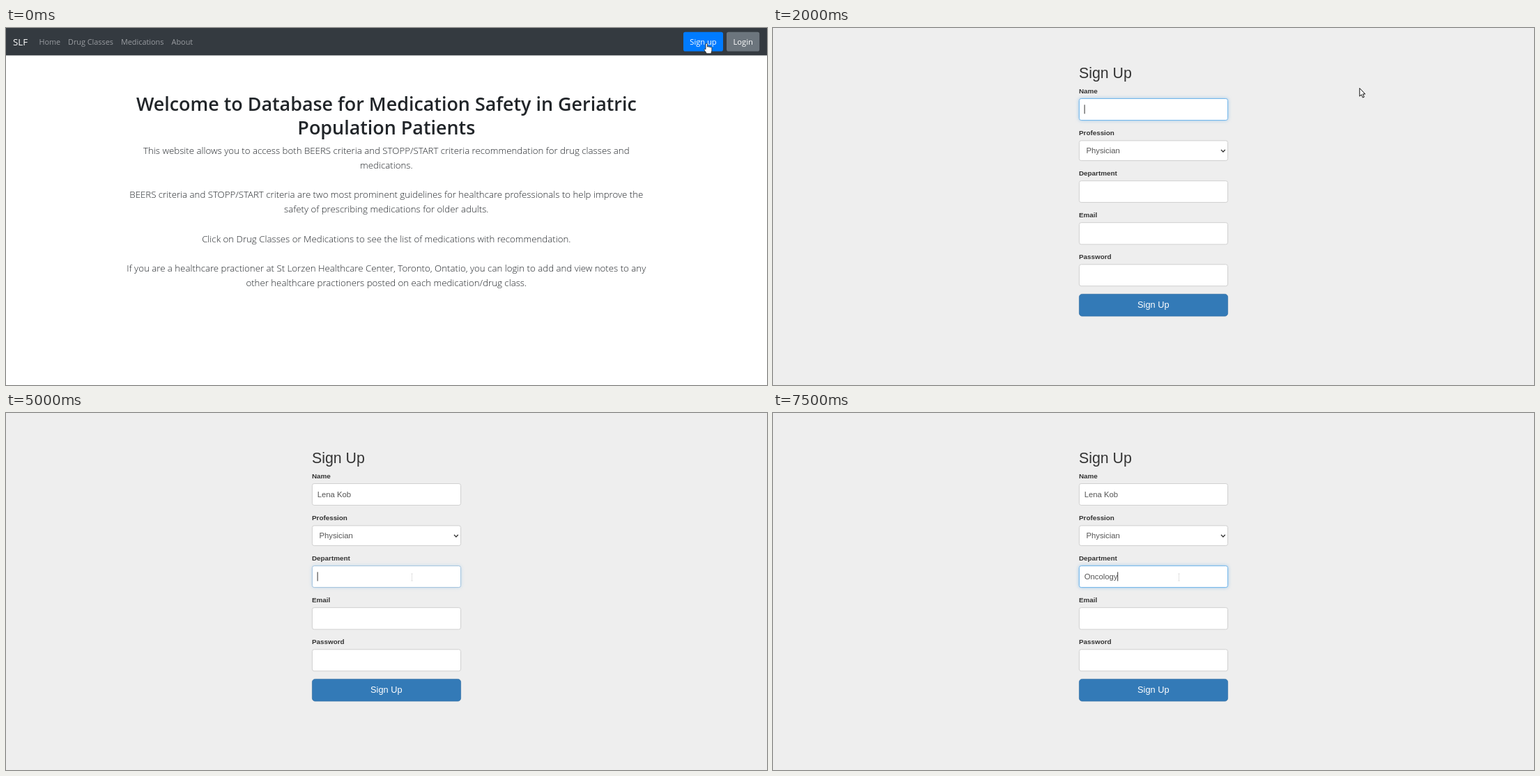
Write an HTML page that moves like this. It is 1092 px wide and 513 px high and loops after 8000 ms.

```html
<!DOCTYPE html>
<html lang="en">
<head>
<meta charset="utf-8">
<title>Sign up</title>
<style>
html, body { margin: 0; width: 100%; height: 100%; overflow: hidden; background: #eee; }
svg { display: block; width: 1092px; height: 513px; }
#home, #status { font-family: "Open Sans", "Noto Sans", sans-serif; }
#form { font-family: "Liberation Sans", Arial, sans-serif; fill: #333; }
.nav { font-size: 10.85px; fill: #999ca0; }
.btn { font-size: 11.1px; fill: #fff; text-anchor: middle; }
.title { font-size: 26.9px; font-weight: 600; fill: #212529; text-anchor: middle; }
.lead { font-size: 13.25px; font-weight: 300; fill: #212529; text-anchor: middle; }
.label { font-size: 9.86px; font-weight: 700; }
.value { font-size: 11.27px; fill: #555; }
.field { fill: #fff; stroke: #ccc; stroke-width: .9; }
.field.focus { stroke: #66afe9; filter: drop-shadow(0 0 2.8px rgba(102,175,233,.6)); }
.field.soft { stroke: #99bddb; filter: drop-shadow(0 0 2.8px rgba(102,175,233,.3)); }
</style>
</head>
<body>
<svg viewBox="0 0 1092 513">
  <g id="home">
    <rect width="1092" height="513" fill="#fff"/>
    <rect width="1092" height="39.4" fill="#343a40"/>
    <text x="10" y="24.8" font-size="13.3" fill="#fff">SLF</text>
    <g class="nav">
      <text x="47.4" y="24">Home</text>
      <text x="89" y="24">Drug Classes</text>
      <text x="165" y="24">Medications</text>
      <text x="237.6" y="24">About</text>
    </g>
    <rect id="ring" x="971" y="4.7" width="59" height="29.8" rx="3.8" fill="#268fff" opacity=".5"/>
    <rect id="join" x="972" y="5.7" width="57" height="27.8" rx="2.8"/>
    <rect x="1034" y="5.7" width="47.2" height="27.8" rx="2.8" fill="#6c757d"/>
    <text class="btn" x="1000.5" y="24">Sign up</text>
    <text class="btn" x="1057.7" y="24">Login</text>
    <g id="copy"></g>
  </g>
  <g id="form">
    <rect width="1092" height="513" fill="#eee"/>
    <text x="439" y="72" font-size="21.3">Sign Up</text>
    <g id="fields"></g>
    <text class="value" x="449.5" y="180.3">Physician</text>
    <path d="M643 175l2.9 3 2.9-3" fill="none" stroke="#333" stroke-width="1.3"/>
    <rect x="439.4" y="382.4" width="213.2" height="31.7" rx="4.2" fill="#337ab7" stroke="#2e6da4" stroke-width=".7"/>
    <text x="545.8" y="402.3" font-size="12.75" fill="#fff" text-anchor="middle">Sign Up</text>
    <text id="name" class="value" x="446.8" y="121"></text>
    <text id="dept" class="value" x="446.8" y="239.2"></text>
    <rect id="caret" width="1" height="13" fill="#333"/>
  </g>
  <g id="status">
    <path d="M0 497.500h90.500a2.500 2.500 0 0 1 2.500 2.500V513H0z" fill="#000"/>
    <text x="2" y="508.500" font-size="8" fill="#6c6c6c">127.0.0.1:5000/register</text>
  </g>
  <path id="hand" transform="translate(1005.200 22.300)" fill="#fff" stroke="#222" stroke-width=".8" stroke-linejoin="round"
    d="M-1.200 8.500V1a1.200 1.200 0 0 1 2.400 0V5a1.200 1.200 0 0 1 2.300.2 1.200 1.200 0 0 1 2.200.5 1.100 1.100 0 0 1 2 .8V10L6.500 14.500H.3L-3.400 9a1.200 1.200 0 0 1 2.200-.5z"/>
  <path id="arrow" fill="#fff" stroke="#111" stroke-width="1" stroke-linejoin="round"
    d="M0 0V11.600l2.600-2.400 1.900 4.300 2-.9-1.900-4.200H8z"/>
  <path id="beam" fill="none" d="M-1.500-5h3M0-5V5M-1.500 5h3"/>
</svg>
<script>
const $ = id => document.getElementById(id);
const STEP = 250, LOOP = 8000;
const NAME = "Lena Kob", DEPT = "Oncology";
const nameTyped = [2, 3, 4, 6, 7, 8];

function add(parent, tag, attrs, text = "") {
  const el = document.createElementNS("http://www.w3.org/2000/svg", tag);
  for (const key in attrs) el.setAttribute(key, attrs[key]);
  el.textContent = text;
  return parent.appendChild(el);
}

const lead = [
  "This website allows you to access both BEERS criteria and STOPP/START criteria recommendation for drug classes and",
  "medications.", "",
  "BEERS criteria and STOPP/START criteria are two most prominent guidelines for healthcare professionals to help improve the",
  "safety of prescribing medications for older adults.", "",
  "Click on Drug Classes or Medications to see the list of medications with recommendation.", "",
  "If you are a healthcare practioner at St Lorzen Healthcare Center, Toronto, Ontatio, you can login to add and view notes to any",
  "other healthcare practioners posted on each medication/drug class."
];
["Welcome to Database for Medication Safety in Geriatric", "Population Patients"].forEach((line, i) =>
  add($("copy"), "text", { class: "title", x: 545.8, y: 118.7 + i * 33.8 }, line));
lead.forEach((line, i) => line &&
  add($("copy"), "text", { class: "lead", x: 545.8, y: 181 + i * 21.12 }, line));

// label, label baseline, box top, box height
const fields = [
  ["Name", 93.5, 101.5, 31],
  ["Profession", 153.7, 161.9, 28.7],
  ["Department", 211.5, 219.7, 30.9],
  ["Email", 271.7, 279.7, 31.2],
  ["Password", 331.7, 339.8, 31]
].map(([label, base, y, height]) => {
  add($("fields"), "text", { class: "label", x: 439, y: base }, label);
  return add($("fields"), "rect", { class: "field", x: 439.4, y, width: 213.2, height, rx: 2.8 });
});

const show = (id, on) => $(id).style.display = on ? "" : "none";
const place = (id, x, y) => $(id).setAttribute("transform", `translate(${x} ${y})`);
const between = (k, a, b) => k >= a && k < b;
const focusClass = (k, from, to) =>
  !between(k, from, to) ? "field" : k === from ? "field soft" : "field focus";

function draw(k) {
  const home = k < 4;
  show("home", home);
  show("form", !home);
  show("hand", home);
  show("status", between(k, 1, 6));
  show("ring", k === 3);
  $("join").setAttribute("fill", k === 0 ? "#007bff" : k < 3 ? "#0069d9" : "#0062cc");

  show("arrow", between(k, 4, 18));
  if (k === 4) place("arrow", 929, 94);
  else if (k === 5) place("arrow", 842, 84);
  else place("arrow", 841.8, 86.5);

  show("beam", k >= 18);
  $("beam").setAttribute("stroke", k === 18 ? "#fafafa" : "#e4e4e4");
  if (k === 18) place("beam", 592.5, 312);
  else if (k === 19) place("beam", 585.5, 256);
  else place("beam", 582.5, 236);

  fields[0].setAttribute("class", focusClass(k, 7, 20));
  fields[2].setAttribute("class", focusClass(k, 20, 32));

  const typed = k < 11 ? 0 : nameTyped[Math.min(k - 11, 5)];
  $("name").textContent = NAME.slice(0, typed);
  $("dept").textContent = DEPT.slice(0, Math.max(0, k - 22));

  const inName = between(k, 7, 9) || between(k, 11, 18);
  const inDept = between(k, 20, 22) || k >= 23;
  show("caret", inName || inDept);
  if (inName || inDept) {
    const text = $(inName ? "name" : "dept");
    const width = text.textContent ? text.getComputedTextLength() : 0;
    $("caret").setAttribute("x", 446.8 + width - .2);
    $("caret").setAttribute("y", inName ? 110.3 : 228.5);
  }
}

let start, last = -1;
function tick(now) {
  start ??= now;
  const k = Math.floor((now - start) % LOOP / STEP);
  if (k !== last) draw(last = k);
  requestAnimationFrame(tick);
}
draw(0);
requestAnimationFrame(tick);
</script>
</body>
</html>
```
